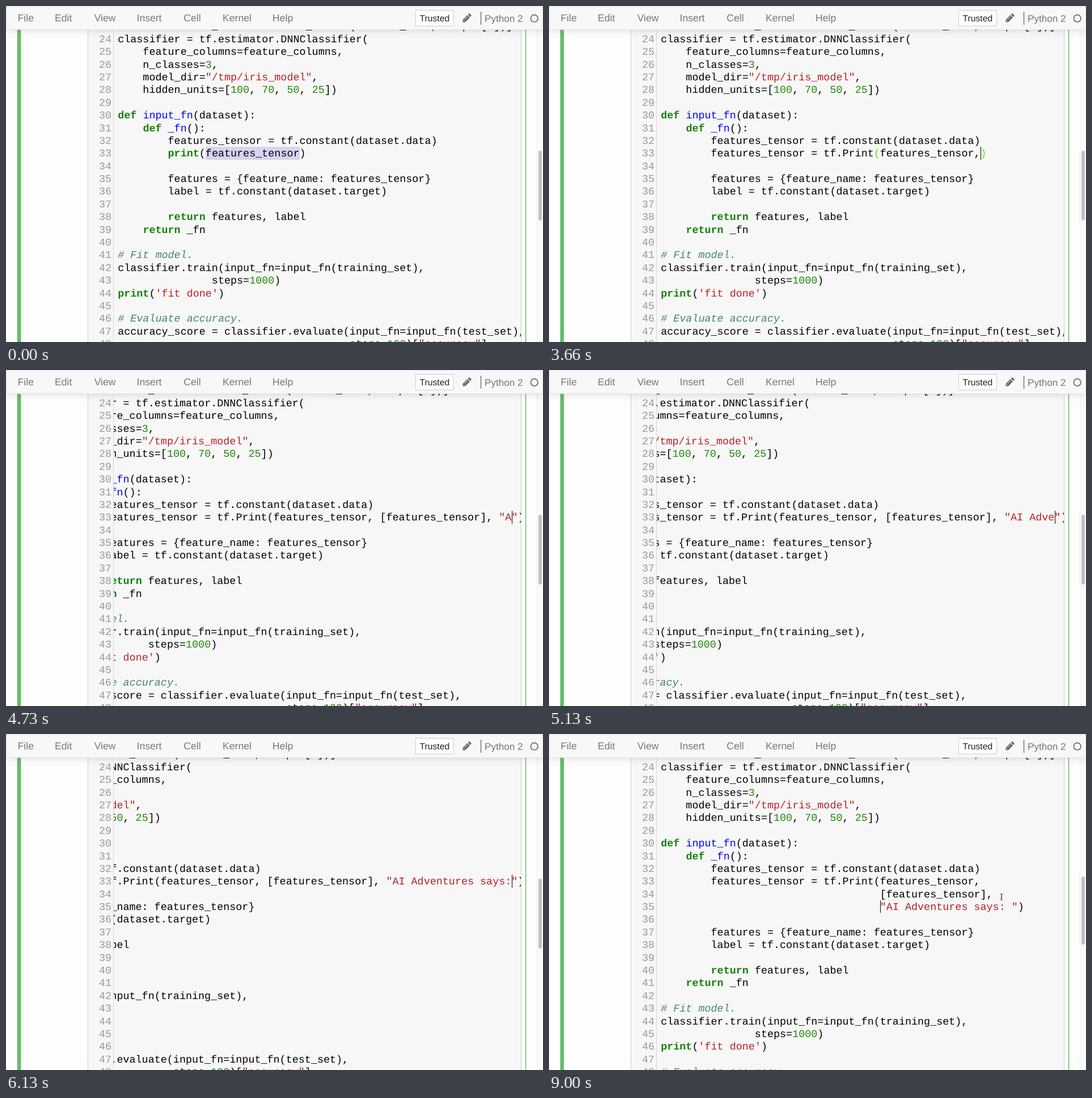
Write an HTML page that moves like this. It is 947 px wide and 592 px high and loops after 9.2 s.

```html
<!DOCTYPE html>
<html lang="en">
<head>
<meta charset="utf-8">
<title>Notebook cell being edited</title>
<style>
  html, body { margin: 0; width: 100%; height: 100%; overflow: hidden; background: #fefefe; }
  body { position: relative; text-rendering: geometricPrecision; }
  div, pre, svg { position: absolute; box-sizing: border-box; margin: 0; }
  pre { font: 18.413px/22.39px "Liberation Mono", "Courier New", monospace; white-space: pre; top: 26.4px; }
  #cell { left: 144px; top: -5px; width: 765px; height: 610px; background: #f7f7f7; border: 1px solid #cfcfcf; }
  #gutter { left: 189px; top: 0; width: 1px; height: 592px; background: #d6d6d6; }
  #nums { left: 164px; color: #999; }
  #view { left: 190px; top: 0; width: 718px; height: 592px; overflow: hidden; }
  #doc { left: 7.2px; top: 0; }
  #sel { background: #d7d4f0; height: 22.39px; top: 248.3px; }
  #caret { width: 1.5px; height: 22.39px; background: #000; }
  #track { left: 936px; top: 0; width: 11px; height: 592px; background: #fafafa; border-left: 1px solid #ebebeb; }
  #thumb { left: 939px; width: 6px; border-radius: 3px; background: #c1c1c1; }
  #head { left: 0; top: 0; width: 947px; height: 42px; background: #f8f8f8; border: 1px solid #e7e7e7;
          border-radius: 2px; box-shadow: 0 0 14px 1px rgba(87, 87, 87, .2); }
  svg { left: 0; top: 0; }
  svg text { font: 17.6px "Liberation Sans", Arial, sans-serif; fill: #777; }
  .kw { color: #148008; font-weight: bold; }
  .num { color: #208808; }
  .str { color: #b5212a; }
  .com { color: #458080; font-style: italic; }
  .fn { color: #00f; }
  .match { color: #5e0; }
</style>
</head>
<body>
<svg width="947" height="592" fill="#66bb6a">
  <rect x="19.8" width="6.6" height="592"/>
  <rect x="915.8" width="1.5" height="592"/>
</svg>
<div id="cell"></div>
<pre id="nums"></pre>
<div id="gutter"></div>
<div id="view"><div id="doc"><div id="sel"></div><pre id="text"></pre><div id="caret"></div></div></div>
<div id="track"></div>
<div id="thumb"></div>
<div id="head"></div>
<svg width="947" height="592">
  <text x="20.6" y="27">File</text>
  <text x="86" y="27">Edit</text>
  <text x="155.7" y="27">View</text>
  <text x="230.5" y="27">Insert</text>
  <text x="313.3" y="27">Cell</text>
  <text x="382" y="27">Kernel</text>
  <text x="470" y="27">Help</text>
  <rect x="722.5" y="7.5" width="66.5" height="27.5" fill="#fff" stroke="#ccc"/>
  <text x="729.5" y="27" style="font-size:15.7px;fill:#222">Trusted</text>
  <path fill="#666" d="M805.5 28.5v-4.3l8.2-8.2 4.3 4.3-8.2 8.2zM814.6 15l1.4-1.4q1-.8 2 0l2.3 2.3q.8 1 0 2l-1.4 1.4z"/>
  <path d="M808.6 24l5.4-5.4M807 25.4l1.8 1.8" stroke="#f8f8f8"/>
  <path d="M837.5 10v23" stroke="#666" stroke-width="1.3"/>
  <text x="844" y="27.6" style="font-size:17.1px">Python 2</text>
  <circle cx="931.7" cy="21.8" r="6.3" fill="none" stroke="#777" stroke-width="1.9"/>
  <path id="mouse" d="M-2.5-5.5Q0-5.5 0-3.5V3.5Q0 5.5-2.5 5.5M2.5-5.5Q0-5.5 0-3.5V3.5Q0 5.5 2.5 5.5M-1.2 2H1.2"
        fill="none" stroke="#444"/>
</svg>
<script>
const LOOP = 9200, CHAR = 11.05, ROW = 22.39, EDIT_TOP = 248.3;
const $ = id => document.getElementById(id);

const above = `     tf.feature_column.numeric_column(feature_name, shape=[4])]
classifier = tf.estimator.DNNClassifier(
    feature_columns=feature_columns,
    n_classes=3,
    model_dir="/tmp/iris_model",
    hidden_units=[100, 70, 50, 25])

def input_fn(dataset):
    def _fn():
        features_tensor = tf.constant(dataset.data)`.split('\n');

const below = `
        features = {feature_name: features_tensor}
        label = tf.constant(dataset.target)

        return features, label
    return _fn

# Fit model.
classifier.train(input_fn=input_fn(training_set),
               steps=1000)
print('fit done')

# Evaluate accuracy.
accuracy_score = classifier.evaluate(input_fn=input_fn(test_set),
                                     steps=100)["accuracy"]`.split('\n');

const arg = 'features_tensor';
const message = '"AI Adventures says: ';
const call = `${arg} = tf.Print(${arg}, [${arg}], ${message}`;
const indent = ' '.repeat(8), hang = ' '.repeat(35);

// First edits: time, text before the caret, text after it
const rename = [
  [0, 'print(', arg + ')'], [460, 'print', `(${arg})`], [730, '', `print(${arg})`],
  [850, 't', `print(${arg})`], [970, 'tf', `print(${arg})`], [1090, 'tf.', `print(${arg})`],
  [1210, 'tf.', `rint(${arg})`], [1330, 'tf.P', `rint(${arg})`]
];

// Caret position within the call: time, characters
const typing = [
  [1600, 0], [2200, 15], [2400, 16], [2460, 17], [2530, 18], [2729, 18], [2730, 20], [2859, 20],
  [2860, 26], [2999, 26], [3000, 42], [3600, 43], [3730, 44], [3800, 45], [4400, 62], [4460, 63],
  [4600, 64], [4800, 67], [5000, 68], [5130, 71], [5330, 72], [6000, 82], [6130, 83], [6260, 84]
];

const blink = [[0, 0], [400, 1], [8130, .5], [8330, 0], [8600, .5], [8800, 1]];

const clamp = x => Math.max(0, Math.min(1, x));
const lastIndex = (keys, t) => keys.filter(k => k[0] <= t).length - 1;
const current = (keys, t) => keys[lastIndex(keys, t)];

function typed(t) {
  const i = lastIndex(typing, t), [t0, n0] = typing[i], [t1, n1] = typing[i + 1] || [t0 + 1, n0];
  return n0 + Math.floor((t - t0) / (t1 - t0) * (n1 - n0));
}

// Lines being edited, with the caret's row and column
function edit(t) {
  if (t < 1600) {
    const [, before, after] = current(rename, t);
    return { lines: [indent + before + after], row: 0, col: 8 + before.length };
  }
  if (t < 6660) {
    const n = typed(t);
    const after = t < 2730 ? `tf.Print(${arg})`
      : t < 3600 ? call.slice(n, 42) + ')'
      : (n > 44 && n < 61 ? ']' : '') + (n > 63 ? '"' : '') + ')';
    return { lines: [indent + call.slice(0, n) + after], row: 0, col: 8 + n };
  }
  const full = indent + call + '")';
  if (t < 6930) return { lines: [full], row: 0, col: 52 };
  const first = full.slice(0, 52), second = hang + full.slice(52);
  if (t < 7800) return { lines: [first, second], row: 1, col: t < 7600 ? 35 : 54 };
  return { lines: [first, second.slice(0, 54), hang + second.slice(54)], row: 2, col: 35 };
}

// Columns of the bracket beside the caret and its partner
function brackets(line, col) {
  const at = [col - 1, col].find(i => line[i] && '()[]'.includes(line[i]));
  if (at === undefined) return [];
  const step = '(['.includes(line[at]) ? 1 : -1;
  for (let i = at, depth = 0; i >= 0 && i < line.length; i += step) {
    if ('(['.includes(line[i])) depth += step;
    if (')]'.includes(line[i])) depth -= step;
    if (!depth) return [at, i];
  }
  return [];
}

const token = /(#.*)|("[^"]*"|'[^']*')|(?<![.\w])(def|return|print)\b|(?<=def )(\w+)|\b(\d+)|([()[\]])/g;
const names = ['com', 'str', 'kw', 'fn', 'num'];

function paint(line, marks) {
  return line.replace(token, (s, ...m) => {
    const name = names[m.findIndex(g => g !== undefined)] || (marks.includes(m[6]) ? 'match' : '');
    return name ? `<span class="${name}">${s}</span>` : s;
  });
}

function scrollAt(t, col) {
  if (t >= 6660) return 0;
  return Math.max(0, 197.2 + col * CHAR - 891.7) * clamp((6660 - t) / 260);
}

let shown = '';
function frame() {
  const t = performance.now() % LOOP;
  const { lines, row, col } = edit(t);
  const marks = t < 400 ? [] : brackets(lines[row], col);
  const html = [
    ...above.map(s => paint(s, [])),
    ...lines.map((s, i) => paint(s, i === row ? marks : [])),
    ...below.map(s => paint(s, []))
  ].slice(0, 26).join('\n');
  if (html !== shown) $('text').innerHTML = shown = html;

  $('doc').style.left = 7.2 - scrollAt(t, col) + 'px';
  $('sel').style.display = t < 400 ? 'block' : 'none';
  Object.assign($('caret').style, {
    left: col * CHAR + 'px', top: EDIT_TOP + row * ROW + 'px', opacity: current(blink, t)[1]
  });

  const added = lines.length - 1;
  Object.assign($('thumb').style, { top: 254.5 - 1.7 * added + 'px', height: 123.5 - 1.8 * added + 'px' });

  const go = clamp((t - 7200) / 400);
  const visible = t >= 7200 || (t >= 6530 && t < 6930);
  $('mouse').setAttribute('transform', `translate(${772 + 26 * go} ${262 + 25 * go})`);
  $('mouse').style.display = visible ? '' : 'none';
  requestAnimationFrame(frame);
}

$('sel').style.left = 14 * CHAR + 'px';
$('sel').style.width = 15 * CHAR + 'px';
$('nums').textContent = Array.from({ length: 26 }, (_, i) => 23 + i).join('\n');
frame();
</script>
</body>
</html>
```
